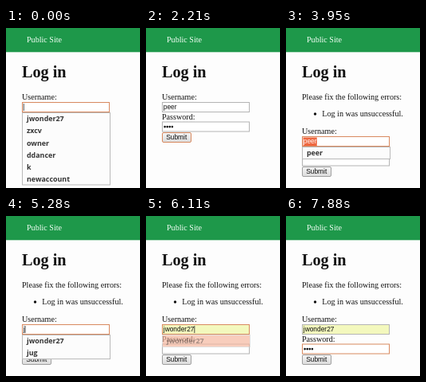
These frames come from a looping animation (168 px wide and 201 px high, 8000 ms). An HTML page with a canvas:

```html
<!DOCTYPE html>
<html lang="en">
<head>
<meta charset="utf-8">
<title>Log in</title>
<style>
  html, body { margin: 0; width: 100%; height: 100%; overflow: hidden; background: #fdfdfd; }
  canvas { display: block; width: 168px; height: 201px; }
</style>
</head>
<body>
<canvas></canvas>
<script>
const WIDTH = 168, HEIGHT = 201, LOOP = 8000;
const SERIF = '10.1px "Liberation Serif", serif';
const HEADING = 'bold 20.2px "Liberation Serif", serif';
const SANS = '8.4px "Liberation Sans", sans-serif';
const MENU = 'bold 8.9px "Open Sans", sans-serif';
const ORANGE = '#d8895f', ROW = 15.1, DOT_PITCH = 3.1;

const LONG = 'jwonder27', SHORT = 'peer';
const ALL = [LONG, 'zxcv', 'owner', 'ddancer', 'k', 'newaccount'];

// Each entry changes part of the state at its time.
const timeline = [
  [0, { errors: false, focus: 'login', login: '', dots: 0, caret: true, items: ALL, menu: 1,
        highlight: false, filled: false, selected: false }],
  [60, { caret: false }],
  [460, { caret: true }],
  [860, { caret: false }],
  [940, { caret: true, login: SHORT.slice(0, 1), items: [SHORT] }],
  [1020, { login: SHORT.slice(0, 2) }],
  [1120, { login: SHORT }],
  [1240, { focus: 'password', menu: 0.6 }],
  [1300, { menu: 0.3 }],
  [1360, { menu: 0 }],
  [1620, { caret: false }],
  [1950, { caret: true, dots: 2 }],
  [2010, { dots: 4 }],
  [2210, { focus: 'button' }],
  [3070, { errors: true, focus: '', dots: 0 }],
  [3390, { focus: 'login', selected: true }],
  [3770, { menu: 0.35 }],
  [3830, { menu: 0.65 }],
  [3890, { menu: 0.85 }],
  [3950, { menu: 1 }],
  [5280, { selected: false, login: LONG.slice(0, 1), items: [LONG, 'jug'] }],
  [5400, { login: LONG.slice(0, 2), items: [LONG] }],
  [5460, { login: LONG.slice(0, 3) }],
  [5860, { caret: false }],
  [5920, { highlight: true }],
  [6050, { caret: true, login: LONG, filled: true, menu: 0.75 }],
  [6110, { menu: 0.42 }],
  [6170, { menu: 0 }],
  [6430, { focus: 'password' }],
  [6830, { caret: false }],
  [7230, { caret: true }],
  [7310, { dots: 1 }],
  [7400, { dots: 3 }],
  [7480, { dots: 4 }],
  [7880, { caret: false }],
];

const canvas = document.querySelector('canvas');
const ctx = canvas.getContext('2d');
const scale = window.devicePixelRatio || 1;
canvas.width = WIDTH * scale;
canvas.height = HEIGHT * scale;

function stateAt(time) {
  const past = timeline.filter(([start]) => start <= time);
  return Object.assign({}, ...past.map(([, change]) => change));
}

function rect(x, y, w, h, color) {
  ctx.fillStyle = color;
  ctx.fillRect(x, y, w, h);
}

function text(string, x, y, font, color = '#111') {
  ctx.font = font;
  ctx.fillStyle = color;
  ctx.fillText(string, x, y);
}

function circle(x, y, r) {
  ctx.fillStyle = '#111';
  ctx.beginPath();
  ctx.arc(x, y, r, 0, Math.PI * 2);
  ctx.fill();
}

function frame(x, y, w, h, color) {
  ctx.strokeStyle = color;
  ctx.lineWidth = 1;
  ctx.strokeRect(x + 0.5, y + 0.5, w - 1, h - 1);
}

function field(y, focused, background = '#fff') {
  rect(20, y, 110, 13, background);
  frame(20, y, 110, 13, focused ? ORANGE : '#b4b4b4');
}

function caret(x, y) {
  rect(x, y + 2, 0.8, 9, '#222');
}

function loginField(s, y) {
  const focused = s.focus === 'login';
  field(y, focused, s.filled ? '#f3f8bd' : '#fff');
  ctx.font = SANS;
  const width = ctx.measureText(s.login).width;
  if (s.selected) rect(21.5, y + 1.5, width + 0.5, 10.5, '#ee673f');
  text(s.login, 21.8, y + 9.4, SANS, s.selected ? '#fff' : '#111');
  if (focused && s.caret && !s.selected) caret(21.8 + width, y);
}

function passwordField(s, y) {
  const focused = s.focus === 'password';
  field(y, focused);
  for (let i = 0; i < s.dots; i++) circle(23.6 + i * DOT_PITCH, y + 6.6, 1.3);
  if (focused && s.caret) caret(21.8 + s.dots * DOT_PITCH, y);
}

function button(y, focused) {
  const shade = ctx.createLinearGradient(0, y, 0, y + 13);
  shade.addColorStop(0, '#f6f6f6');
  shade.addColorStop(1, '#dadada');
  ctx.fillStyle = shade;
  ctx.strokeStyle = focused ? ORANGE : '#a0a0a0';
  ctx.lineWidth = 1;
  ctx.beginPath();
  ctx.roundRect(20.5, y + 0.5, 36, 12, 1.5);
  ctx.fill();
  ctx.stroke();
  text('Submit', 25.2, y + 9.3, SANS);
}

function menu(s, y) {
  const height = s.items.length * ROW + 0.9;
  ctx.globalAlpha = s.menu;
  rect(20, y, 111, height, '#fcfcfc');
  if (s.highlight) rect(21, y + 1, 109, ROW - 1, '#f08a62');
  frame(20, y, 111, height, '#b9b9b9');
  s.items.forEach((item, i) => text(item, 26, y + 11.3 + i * ROW, MENU, '#333'));
  ctx.globalAlpha = 1;
}

function draw(s) {
  ctx.setTransform(scale, 0, 0, scale, 0, 0);
  rect(0, 0, WIDTH, HEIGHT, '#fdfdfd');
  rect(0, 0, WIDTH, 30.3, '#1e984a');
  text('Public Site', 26, 18.4, SERIF, '#f4fff6');
  text('Log in', 20, 62, HEADING);

  if (s.errors) {
    text('Please fix the following errors:', 20, 90, SERIF);
    circle(36.5, 108, 1.7);
    text('Log in was unsuccessful.', 45.3, 111, SERIF);
  }

  const top = s.errors ? 43 : 0;
  text('Username:', 20, top + 90, SERIF);
  loginField(s, top + 93);
  text('Password:', 20, top + 114.6, SERIF);
  passwordField(s, top + 117.5);
  button(top + 131, s.focus === 'button');
  if (s.menu) menu(s, top + 106);
}

function tick() {
  draw(stateAt(performance.now() % LOOP));
  requestAnimationFrame(tick);
}
tick();
</script>
</body>
</html>
```
